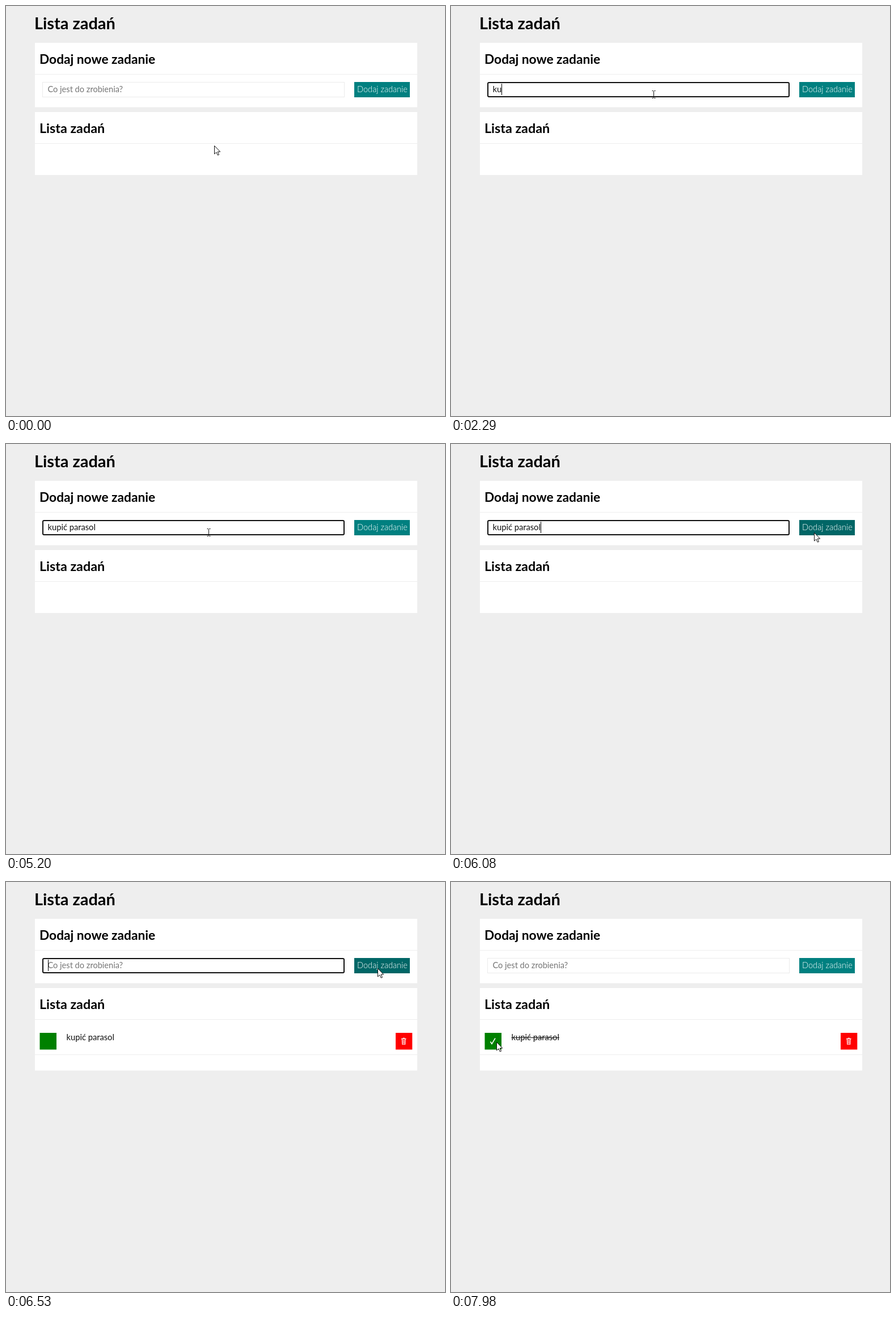
Recreate the animation shown at these times as an HTML page with a canvas. Size 774 by 723 pixels, loop 8000 ms.

```html
<!DOCTYPE html>
<html lang="pl">
<head>
<meta charset="utf-8">
<title>Lista zadań</title>
<style>
  html, body { margin: 0; width: 100%; height: 100%; overflow: hidden; background: #eee; }
  canvas { display: block; }
</style>
</head>
<body>
<canvas id="stage" width="774" height="723"></canvas>
<script>
const ctx = document.getElementById('stage').getContext('2d');
const LOOP = 8000;
const TASK = 'kupić parasol';
const KEY_TIMES = [2090, 2290, 2490, 2670, 3130, 3330, 3530, 3660, 3860, 3990, 4320, 4520, 4720];
const CARET_ON = [[1010, 1540], [2090, 5200], [5730, 6330], [6530, 7060], [7620, 7840]];
const FOCUSED = [[1010, 6460], [6530, 7840]];
const ADDED = 6530, DONE = 7910;

// Each move runs along a quadratic curve in visible steps.
const MOVES = [
  { start: 260, end: 830, steps: 9, path: [[367, 246], [364, 200], [357, 155]] },
  { start: 5800, end: 6150, steps: 6, path: [[357, 155], [560, 178], [655, 152]] },
  { start: 6810, end: 7550, steps: 11, path: [[655, 152], [400, 225], [80, 282]] }
];
const CLICKS = [
  { start: 1010, end: 1140, x: 355, y: 154 },
  { start: 6460, end: 6530, x: 654, y: 152 },
  { start: 7840, end: 7980, x: 79, y: 282 }
];

const within = (t, ranges) => ranges.some(([a, b]) => t >= a && t < b);

function rect(x, y, w, h, color) {
  ctx.fillStyle = color;
  ctx.fillRect(x, y, w, h);
}

function text(str, x, y, size, weight = 400, color = '#111') {
  ctx.font = `${weight} ${size}px Lato, "Open Sans", sans-serif`;
  ctx.fillStyle = color;
  ctx.fillText(str, x, y);
  return ctx.measureText(str).width;
}

function polyline(points, color, width) {
  ctx.beginPath();
  points.forEach(([x, y]) => ctx.lineTo(x, y));
  ctx.strokeStyle = color;
  ctx.lineWidth = width;
  ctx.stroke();
}

function pointerAt(t) {
  let pos = MOVES[0].path[0];
  for (const { start, end, steps, path: [a, b, c] } of MOVES) {
    if (t < start) break;
    const step = Math.floor((t - start) / (end - start) * (steps - 1) + 0.01) + 1;
    const u = Math.min(1, step / steps);
    const e = u * u * (3 - 2 * u);
    pos = a.map((v, i) => (1 - e) ** 2 * v + 2 * e * (1 - e) * b[i] + e * e * c[i]);
  }
  return pos.map(Math.round);
}

function inBox([x, y], left, top, right, bottom) {
  return x >= left && x < right && y >= top && y < bottom;
}

function drawPanel(y, h, title, titleSize) {
  rect(51, y, 674, h, '#fff');
  rect(51, y + 55, 674, 1, '#eee');
  text(title, 59, y + 37, titleSize, 700, '#000');
}

function drawInput(t) {
  const typed = t < ADDED ? TASK.slice(0, KEY_TIMES.filter(k => t >= k).length) : '';
  if (within(t, FOCUSED)) {
    ctx.beginPath();
    ctx.roundRect(65, 135, 531, 25, 2);
    ctx.strokeStyle = '#101010';
    ctx.lineWidth = 2;
    ctx.stroke();
  } else {
    ctx.strokeStyle = '#ebebeb';
    ctx.lineWidth = 1;
    ctx.strokeRect(64.5, 134.5, 532, 26);
  }
  const width = typed
    ? text(typed, 73.5, 152, 14.7)
    : text('Co jest do zrobienia?', 73.5, 152, 14.6, 400, '#757575') * 0;
  if (within(t, CARET_ON)) rect(Math.round(73.6 + width), 137, 1, 20, '#000');
}

function drawButton(t, pointer) {
  const pressed = t >= 6460 && t < 6530;
  const hover = inBox(pointer, 614, 134, 712, 161);
  rect(614, 134, 98, 27, hover && !pressed ? '#006666' : '#008080');
  text('Dodaj zadanie', 619, 152, 14.6, 300, '#fff');
}

function drawTask(done) {
  rect(51, 304, 674, 1, '#eee');
  rect(59.5, 266, 29.5, 29.5, '#008000');
  const width = text(TASK, 106.5, 279, 14.7);
  if (done) {
    rect(106.5, 274, width, 1, '#111');
    polyline([[69.5, 281.5], [72, 285.5], [78, 275.5]], '#fff', 1.5);
  }
  rect(687, 266, 29.3, 29.5, '#f00');
  polyline([[697, 276.5], [705.5, 276.5]], '#fff', 1.3);
  polyline([[699.5, 275.2], [703, 275.2]], '#fff', 1);
  polyline([[698.3, 277], [698.8, 286.3], [703.7, 286.3], [704.2, 277]], '#fff', 1.1);
  for (const x of [700.3, 702.2]) polyline([[x, 278], [x, 285]], '#fff', 0.9);
}

function drawPointer([x, y]) {
  ctx.save();
  ctx.translate(x + 0.5, y + 0.5);
  if (inBox([x, y], 64, 134, 597, 161)) {
    polyline([[-3, -6], [-1, -6], [0, -5], [1, -6], [3, -6]], '#111', 1);
    polyline([[0, -5], [0, 6]], '#111', 1);
    polyline([[-3, 7], [-1, 7], [0, 6], [1, 7], [3, 7]], '#111', 1);
  } else {
    ctx.beginPath();
    [[0, 0], [0, 14.5], [3.4, 11.4], [5.8, 16.6], [8, 15.7], [5.7, 10.5], [10.2, 10.5]]
      .forEach(([px, py]) => ctx.lineTo(px, py));
    ctx.closePath();
    ctx.fillStyle = '#fff';
    ctx.fill();
    ctx.strokeStyle = '#111';
    ctx.lineWidth = 1;
    ctx.stroke();
  }
  ctx.restore();
}

function draw(t) {
  const pointer = pointerAt(t);
  const added = t >= ADDED;
  rect(0, 0, 774, 723, '#eee');
  text('Lista zadań', 50, 41, 28.9, 700, '#000');
  drawPanel(65, 113.5, 'Dodaj nowe zadanie', 22.7);
  drawInput(t);
  drawButton(t, pointer);
  drawPanel(187, added ? 145.5 : 111, 'Lista zadań', 23.3);
  if (added) drawTask(t >= DONE);
  const click = CLICKS.find(c => t >= c.start && t < c.end);
  if (click) {
    ctx.beginPath();
    ctx.arc(click.x, click.y, 10.7, 0, Math.PI * 2);
    ctx.fillStyle = 'rgba(255, 248, 0, 0.54)';
    ctx.fill();
  }
  drawPointer(pointer);
}

const began = performance.now();
function tick() {
  draw((performance.now() - began) % LOOP);
  requestAnimationFrame(tick);
}
tick();
</script>
</body>
</html>
```
